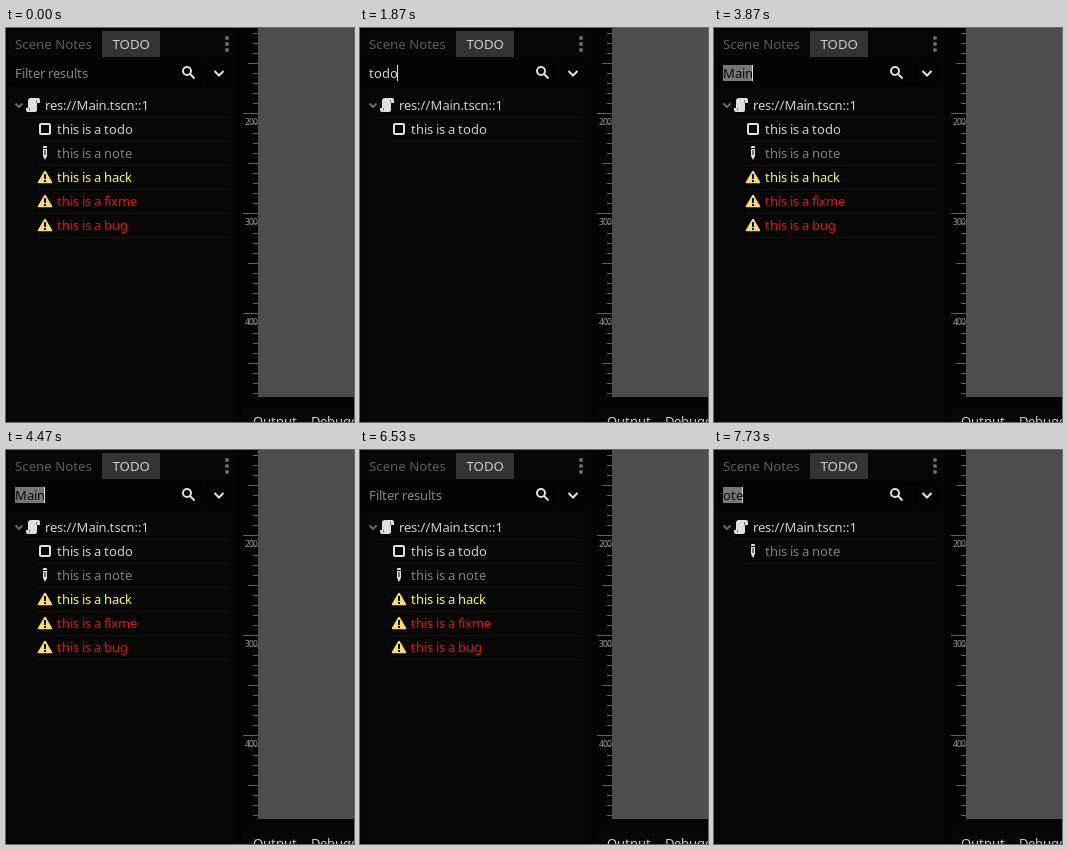
Animation, 348 px wide and 394 px high, one loop 8 s. Source, as an HTML page:

```html
<!DOCTYPE html>
<html lang="en">
<head>
<meta charset="utf-8">
<title>TODO panel filter</title>
<style>
  html, body { margin: 0; width: 100%; height: 100%; overflow: hidden; background: #030302; }
  svg { display: block; }
  text { font: 13px "Noto Sans", sans-serif; fill: #cdcdcd; }
  .tab { font-size: 13.25px; }
  .tick { font-size: 8.5px; fill: #9a9a9a; }
  .line { fill: none; stroke: #e0e0e0; stroke-width: 2; }
</style>
</head>
<body>
<svg id="stage" width="348" height="394" viewBox="0 0 348 394">
  <defs>
    <g id="box"><rect class="line" x="34" y="96" width="10" height="10" rx="1"/></g>
    <g id="pen" fill="#e0e0e0">
      <path d="M37 96V95a1 1 0 0 1 1-1h2a1 1 0 0 1 1 1v1z"/>
      <path d="M37 97h4v7l-2 4-2-4z"/>
      <path d="M38.5 98h1v5h-1z" fill="#060604"/>
    </g>
    <g id="warn">
      <path d="M39 95.5L45.5 106.5H32.5z" fill="#ffdd65" stroke="#ffdd65" stroke-width="1.5" stroke-linejoin="round"/>
      <path d="M38 98h2v5h-2zM38 104h2v2h-2z" fill="#060604"/>
    </g>
  </defs>

  <rect x="2" width="228" height="394" fill="#060604"/>
  <rect x="3" y="32" width="194" height="26" fill="#030302"/>
  <rect x="200" y="32" width="26" height="26" fill="#030302"/>
  <rect x="96" y="3" width="58" height="26" fill="#333"/>
  <text class="tab" x="9" y="21" style="fill:#5c5c5c">Scene Notes</text>
  <text class="tab" x="106.5" y="21">TODO</text>
  <g fill="#6c6c6c">
    <circle cx="221" cy="10" r="2"/><circle cx="221" cy="16" r="2"/><circle cx="221" cy="22" r="2"/>
  </g>

  <circle class="line" cx="181" cy="43" r="4"/>
  <path class="line" d="M184 46l4.5 4.5"/>
  <path class="line" d="M208.5 43l4.5 4.5 4.5-4.5"/>
  <path class="line" d="M9.5 75.5l3.5 3.5 3.5-3.5" style="stroke:#686868"/>
  <path transform="translate(19 69)" fill="#e0e0e0"
    d="M6 1a3 3 0 0 0-3 3v7H1v2a2 2 0 0 0 2 2h7a2 2 0 0 0 2-2V6h3V3a2 2 0 0 0-2-2z"/>
  <path transform="translate(19 69)" fill="none" stroke="#777" d="M4.5 11v2.5M11.5 6V3"/>

  <rect id="mark" x="9" y="37" height="16" fill="#777"/>
  <g id="list"></g>
  <rect id="caret" y="37" width="1" height="16" fill="#dcdcdc"/>

  <rect x="237" y="377" width="111" height="17" fill="#060604"/>
  <rect x="252" width="96" height="369" fill="#4d4d4d"/>
  <g id="ruler"></g>
</svg>
<script>
const LOOP = 8000;
const $ = id => document.getElementById(id);
const pen = document.createElement('canvas').getContext('2d');
pen.font = '13px "Noto Sans", sans-serif';

// Glyph advances are snapped to the pixel grid
const snapped = { ':': 3.5, '1': 8 };
const advance = c => snapped[c] || Math.round(pen.measureText(c).width);
const width = s => [...s].reduce((sum, c) => sum + advance(c), 0);

function add(parent, tag, attrs) {
  const el = document.createElementNS('http://www.w3.org/2000/svg', tag);
  for (const k in attrs) el.setAttribute(k, attrs[k]);
  return parent.appendChild(el);
}

function setText(el, str, x, color) {
  el.textContent = str;
  el.setAttribute('x', [...str].map((_, i) => x + width(str.slice(0, i))).join(' ') || x);
  if (color) el.style.fill = color;
}

function label(parent, str, x, y, color) {
  const el = add(parent, 'text', { y });
  setText(el, str, x, color);
  return el;
}

const stage = $('stage'), list = $('list'), ruler = $('ruler');
label(stage, 'res://Main.tscn::1', 39, 82);
label(stage, 'Output', 247, 398);
label(stage, 'Debugger', 305, 398);
const field = label(stage, '', 9, 50);

add(list, 'path', { d: 'M20 89.5H221', stroke: '#131312' });
const rows = [
  ['todo', 'box', '#cdcdcd'],
  ['note', 'pen', '#808080'],
  ['hack', 'warn', '#ffff28'],
  ['fixme', 'warn', '#f80808'],
  ['bug', 'warn', '#f80808']
].map(([word, icon, color]) => {
  const g = add(list, 'g', {});
  add(g, 'use', { href: '#' + icon });
  add(g, 'path', { d: 'M32 113.5H221', stroke: '#131312' });
  label(g, 'this is a ' + word, 51, 106, color);
  return g;
});

for (let y = 5; y < 369; y += 10) {
  const len = y % 100 === 85 ? 15 : y % 50 === 35 ? 10 : 5;
  add(ruler, 'rect', { x: 252 - len, y, width: len, height: 1, fill: '#5e5e5e' });
  if (len === 15) {
    const t = add(ruler, 'text', { class: 'tick', x: '239 243 247', y: y + 12 });
    t.textContent = y + 115;
  }
}

// [time, typed text, cursor: 0 hidden, 1 shown, 2 all selected, visible rows]
const ALL = [0, 1, 2, 3, 4];
const steps = [
  [0, '', 0, ALL],
  [330, '', 1, ALL],
  [1070, '', 0, ALL],
  [1400, 't', 1, ALL],
  [1530, 'to', 1, [0]],
  [1870, 'todo', 1, [0]],
  [2400, 'todo', 2, [0]],
  [2600, '', 1, ALL],
  [3070, 'M', 1, ALL],
  [3130, 'Ma', 1, ALL],
  [3270, 'Main', 1, ALL],
  [3870, 'Main', 2, ALL],
  [4070, '', 1, ALL],
  [4470, 'Main', 2, ALL],
  [4530, '', 1, ALL],
  [4870, ':', 1, ALL],
  [5000, '::', 1, ALL],
  [5200, '::1', 1, ALL],
  [5670, '::1', 2, ALL],
  [5870, '', 1, ALL],
  [6530, '', 0, ALL],
  [7130, 'o', 1, [0, 1]],
  [7270, 'ot', 1, [1]],
  [7400, 'ote', 1, [1]],
  [7730, 'ote', 2, [1]]
];

let shown;
function show(step) {
  if (step === shown) return;
  shown = step;
  const [, str, cursor, visible] = step;
  const w = width(str), selected = cursor === 2;
  setText(field, str || 'Filter results', 9, selected ? '#0a0a0a' : str ? '#d0d0d0' : '#858585');
  $('mark').setAttribute('width', selected ? w - 1 : 0);
  $('caret').setAttribute('x', Math.max(9, Math.floor(8 + w)));
  $('caret').style.display = cursor ? '' : 'none';
  rows.forEach((g, i) => {
    const at = visible.indexOf(i);
    g.style.display = at < 0 ? 'none' : '';
    g.setAttribute('transform', `translate(0 ${24 * at})`);
  });
}

const start = performance.now();
function frame() {
  const t = (performance.now() - start) % LOOP;
  show(steps.findLast(s => s[0] <= t));
  requestAnimationFrame(frame);
}
frame();
</script>
</body>
</html>
```
